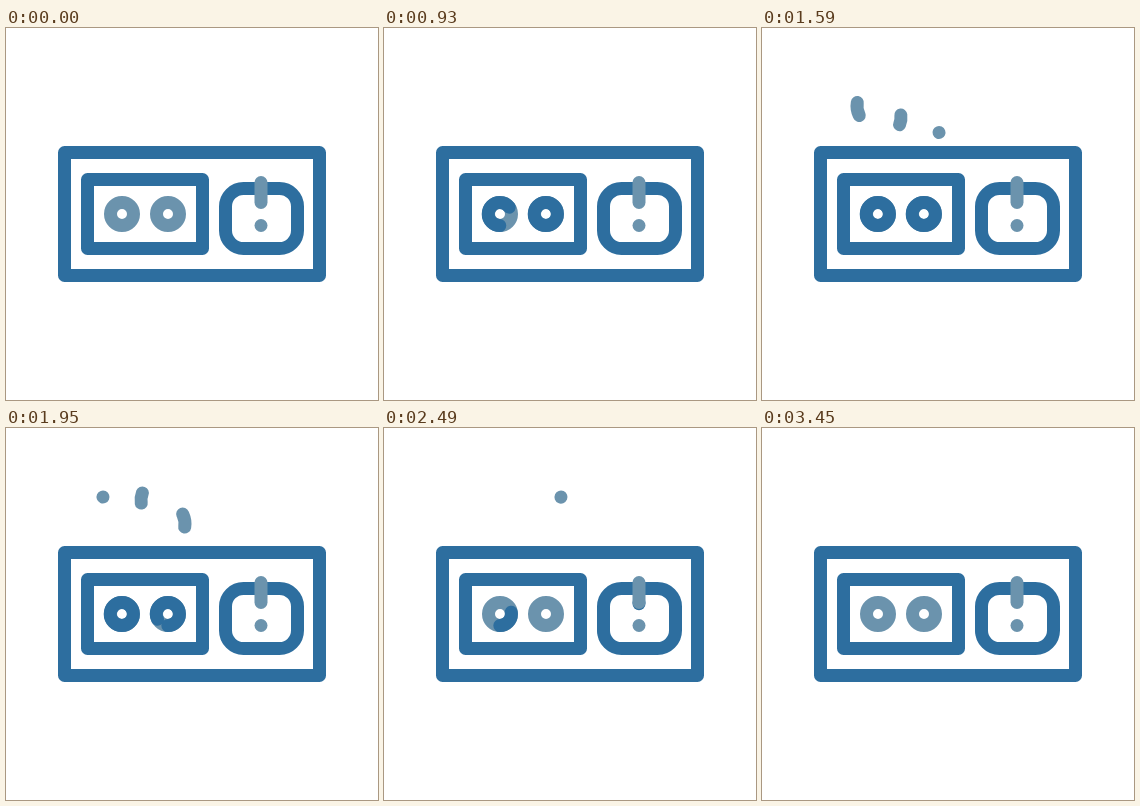
An HTML page for the animation above (3.6 s loop, 372 by 372 pixels).

```html
<!DOCTYPE html>
<html lang="en">
<head>
<meta charset="utf-8">
<title>Stove and sink</title>
<style>
  html, body { margin: 0; height: 100%; overflow: hidden; background: #fff; }
  svg { display: block; width: 100%; height: 100%; }
  svg * { fill: none; stroke-width: 13; stroke-linecap: round; stroke-linejoin: round; }
  .dark { stroke: #2d6e9f; }
  .light { stroke: #6b93ad; }
</style>
</head>
<body>
<svg viewBox="0 0 372 372">
  <g class="dark">
    <rect x="58.5" y="124.5" width="255" height="123"/>
    <rect x="81.5" y="151.5" width="115" height="69"/>
    <rect x="219.5" y="160.5" width="72" height="60" rx="18"/>
  </g>
  <g class="light">
    <circle cx="116" cy="186" r="11.5"/>
    <circle cx="162" cy="186" r="11.5"/>
    <path d="M255 197.5v.01"/>
  </g>
  <g id="moving"></g>
  <path class="light" d="M255 154.5v20"/>
</svg>
<script>
const LOOP = 3600;
const moving = document.getElementById('moving');

const ring = x => `M${x} 197.6a11.6 11.6 0 0 1 0-23.2a11.6 11.6 0 0 1 0 23.2`;
const steam = (x, y, h) => `M${x} ${y}q4 ${-h / 4} 0 ${-h / 2}t0 ${-h / 2}`;

// Each stroke is drawn by its head, then erased by its tail: [start, duration]
const strokes = [
  { d: ring(161.8), tone: 'dark', head: [10, 900], tail: [1760, 720] },
  { d: ring(115.8), tone: 'dark', head: [390, 900], tail: [2020, 720] },
  { d: steam(97, 104.5, 35.5), tone: 'light', head: [1050, 720], tail: [1235, 730] },
  { d: steam(137, 98, 34.5), tone: 'light', head: [1320, 720], tail: [1505, 730] },
  { d: steam(177, 104.5, 35.5), tone: 'light', head: [1580, 720], tail: [1765, 750] },
  { d: 'M255 174.5v23', tone: 'dark', head: [2370, 900], tail: [2510, 930] }
];

for (const stroke of strokes) {
  const path = document.createElementNS('http://www.w3.org/2000/svg', 'path');
  path.setAttribute('d', stroke.d);
  path.setAttribute('class', stroke.tone);
  path.setAttribute('pathLength', 1);
  moving.append(path);
  stroke.path = path;
}

function ease(time, [start, duration]) {
  const p = Math.min(1, Math.max(0, (time - start) / duration));
  return p * p * (3 - 2 * p);
}

function draw(now) {
  const time = now % LOOP;
  for (const { path, head, tail } of strokes) {
    const to = ease(time, head);
    const from = ease(time, tail);
    path.style.display = to > from ? '' : 'none';
    path.setAttribute('stroke-dasharray', `${to - from} 2`);
    path.setAttribute('stroke-dashoffset', -from);
  }
}

const began = performance.now();
function tick() {
  draw(performance.now() - began);
  requestAnimationFrame(tick);
}
tick();
</script>
</body>
</html>
```
